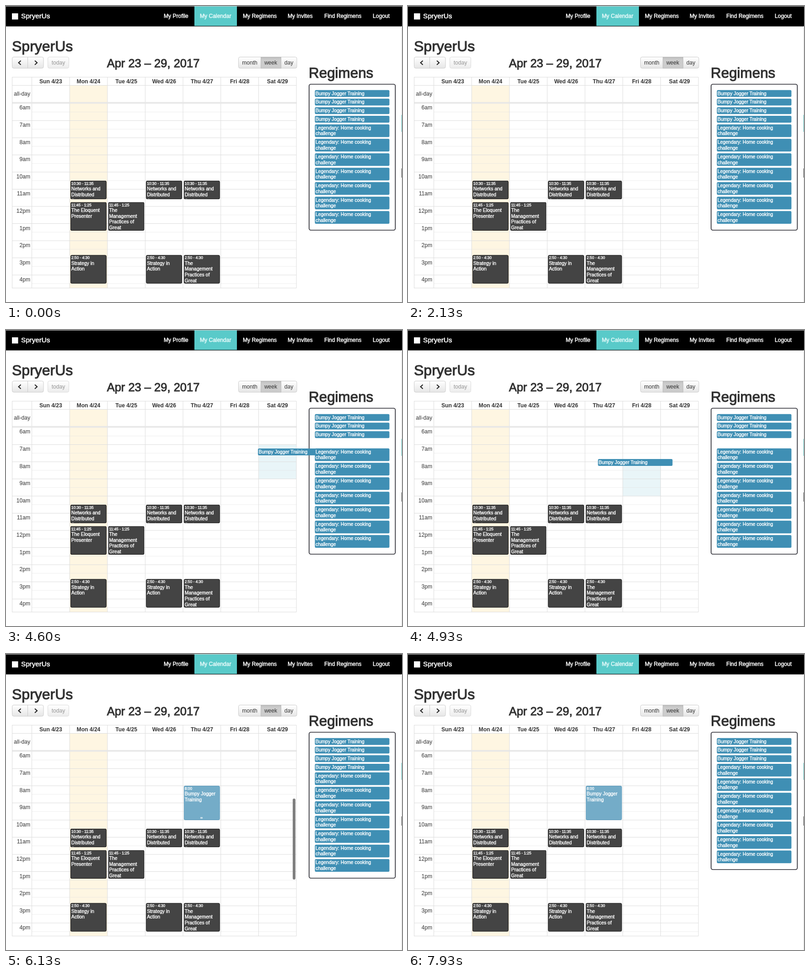
These frames come from a looping animation (866x647 px, 8 s). An HTML page:

```html
<!DOCTYPE html>
<html lang="en">
<head>
<meta charset="utf-8">
<title>Weekly calendar</title>
<style>
  html, body { margin: 0; width: 100%; height: 100%; overflow: hidden; background: #fff; }
  svg { font-family: "Liberation Sans", Arial, sans-serif; }
  #stage { display: block; width: 100vw; height: 100vh; }
  text { white-space: pre; }
</style>
</head>
<body>
<svg id="stage" viewBox="0 0 866 647"></svg>
<script>
const LOOP = 8000;
const DROP = 5800, REMOVE = 6500, LEAVE = 6950;
const GRID = { left: 56.5, top: 213, col: 82.65, hour: 37.5, right: 635, bottom: 616.5 };
const LIST = { x: 675.5, y: 183.7, w: 163, single: 18.75, double: 31.6, line: 12.75 };
const INK = '#333', LINE = '#ddd', BLUE = '#3f8fb4';
const BRAND = 'SpryerUs', TRAINING = 'Bumpy Jogger Training';

const colX = c => GRID.left + c * GRID.col;
const hourY = h => GRID.top + (h - 6) * GRID.hour;
const range = n => [...Array(n).keys()];

const rect = (x, y, w, h, fill, more = '') =>
  `<rect x="${x}" y="${y}" width="${w}" height="${h}" fill="${fill}" ${more}/>`;
const hline = (x1, x2, y, more = '') =>
  `<path d="M${x1} ${y}H${x2}" stroke="${LINE}" ${more}/>`;
const vline = (x, y1, y2, color = LINE) =>
  `<path d="M${x} ${y1}V${y2}" stroke="${color}"/>`;

// y is the middle of the capitals; weight thickens the strokes
function text(str, x, y, size, { fill = INK, weight = 0, anchor = 'start', bold = false } = {}) {
  return `<text x="${x}" y="${y + size * 0.36}" font-size="${size}" fill="${fill}" text-anchor="${anchor}"
    stroke="${fill}" stroke-width="${weight}" ${bold ? 'font-weight="bold"' : ''}>${str}</text>`;
}

function navbar() {
  const links = [['My Profile', 345], ['My Calendar', 424], ['My Regimens', 518],
    ['My Invites', 616], ['Find Regimens', 696], ['Logout', 802]];
  return rect(0, 1, 866, 43.6, '#000') + rect(412, 1, 93, 42.5, '#59cac9') +
    rect(13, 16, 13.5, 13.5, '#fff') +
    text(BRAND, 33, 22, 15.2, { fill: '#fff', weight: 0.55 }) +
    links.map(([label, x]) => text(label, x, 22, 12.1,
      { fill: label === 'My Calendar' ? '#e9fafa' : '#fff', weight: 0.5 })).join('');
}

function toolbar() {
  const button = (x, w, more = '') =>
    rect(x, 111.5, w, 24.5, 'url(#btn)', `stroke="#ccc" rx="3.5" ${more}`);
  const label = (str, x, fill = INK) => text(str, x, 124, 12.1, { fill, anchor: 'middle' });
  const chevron = (x, dir) =>
    `<path d="M${x - 2.5 * dir} 119.5l${5 * dir} 4.5l${-5 * dir} 4.5" fill="none" stroke="#222" stroke-width="2.1"/>`;
  return button(13.5, 68.5) + vline(47.5, 112, 136, '#ccc') + chevron(30, -1) + chevron(65.5, 1) +
    button(91.5, 46, 'opacity=".7"') + label('today', 114.5, '#959595') +
    text('Apr 23 – 29, 2017', 322, 125, 25.5, { weight: 1, anchor: 'middle' }) +
    button(508.5, 127.5) + rect(557.5, 111.5, 44, 24.5, 'url(#pressed)', 'stroke="#bbb"') +
    label('month', 533) + label('week', 579) + label('day', 618.5);
}

function grid() {
  const days = ['Sun 4/23', 'Mon 4/24', 'Tue 4/25', 'Wed 4/26', 'Thu 4/27', 'Fri 4/28', 'Sat 4/29'];
  const hours = ['6am', '7am', '8am', '9am', '10am', '11am', '12pm', '1pm', '2pm', '3pm', '4pm'];
  const rows = hours.map((label, i) => {
    const y = GRID.top + i * GRID.hour;
    return (i ? hline(13, GRID.right, y) : '') +
      hline(GRID.left, GRID.right, y + GRID.hour / 2, 'stroke-dasharray="1 1"') +
      text(label, 53, 222 + i * 37.6, 12.1, { anchor: 'end' });
  }).join('');
  return rows + range(8).map(c => vline(colX(c), 155.5, GRID.bottom)).join('') +
    vline(13.5, 155.5, GRID.bottom) +
    [155.5, 173.5, GRID.bottom].map(y => hline(13, GRID.right, y)).join('') +
    rect(13.5, 210.5, 621.5, 2.5, '#eee', `stroke="${LINE}" stroke-width=".8"`) +
    days.map((d, c) => text(d, colX(c + 0.5), 165, 12.1, { anchor: 'middle', bold: true })).join('') +
    text('all-day', 53, 192, 12.1, { anchor: 'end' });
}

function calendarEvent(col, from, to, time, lines, fill = '#444', border = '#000') {
  const white = { fill: '#fff', weight: 0.4 };
  const height = (to - from) * GRID.hour;
  return `<svg x="${colX(col) + 1.7}" y="${hourY(from)}" width="79" height="${height}">` +
    rect(0.5, 0.5, 78, height - 1, fill, 'rx="2.5"') +
    text(time, 2, 6, 8.4, white) +
    lines.map((s, i) => text(s, 2, 17.7 + i * 12.7, 10.45, white)).join('') +
    rect(0.5, 0.5, 78, height - 1, 'none', `stroke="${border}" rx="2.5"`) + '</svg>';
}

function classes() {
  const networks = ['Networks and', 'Distributed', 'Systems'];
  const management = ['The', 'Management', 'Practices of', 'Great'];
  const strategy = ['Strategy in', 'Action'];
  const at = (h, m) => h + m / 60;
  const morning = c => calendarEvent(c, at(10, 30), at(11, 35), '10:30 - 11:35', networks);
  const noon = (c, lines) => calendarEvent(c, at(11, 45), at(13, 25), '11:45 - 1:25', lines);
  const afternoon = (c, lines) => calendarEvent(c, at(14, 50), at(16, 30), '2:50 - 4:30', lines);
  return [1, 3, 4].map(morning).join('') +
    noon(1, ['The Eloquent', 'Presenter']) + noon(2, management) +
    afternoon(1, strategy) + afternoon(3, strategy) + afternoon(4, management);
}

function card(y, lines, id = '') {
  return `<g ${id && `id="${id}"`}>` +
    rect(LIST.x, y, LIST.w, 2.2 + lines.length * LIST.line, BLUE, 'rx="2.5"') +
    lines.map((s, i) => text(s, LIST.x + 1.5, y + 7.3 + i * LIST.line, 10.4, { fill: '#fff', weight: 0.4 })).join('') +
    '</g>';
}

function sidebar() {
  const cooking = range(7).map(i => card(LIST.y + 4 * LIST.single + i * LIST.double,
    ['Legendary: Home cooking', 'challenge'])).join('');
  return text('Regimens', 662, 146, 31.4, { weight: 1.1 }) +
    rect(662.8, 171, 188.6, 319, 'none', 'id="panel" stroke="#2b2b33" stroke-width="1.7" rx="4"') +
    range(4).map(i => card(LIST.y + i * LIST.single, [TRAINING], i === 3 ? 'dragged' : '')).join('') +
    `<g id="cooking">${cooking}</g>`;
}

const windowEdge = () => vline(865.5, 44, 647, '#ddd') + vline(865.5, 238, 275, '#3fa9a8') +
  vline(865.5, 355, 375, '#333');

const stage = document.getElementById('stage');
stage.innerHTML = `<defs>
    <linearGradient id="btn" x2="0" y2="1"><stop stop-color="#fff"/><stop offset="1" stop-color="#e6e6e6"/></linearGradient>
    <linearGradient id="pressed" x2="0" y2="1"><stop stop-color="#bdbdbd"/><stop offset=".25" stop-color="#ccc"/></linearGradient>
  </defs>` +
  rect(0, 0, 866, 647, '#fff') + rect(0, 0, 866, 1, '#ccc') +
  rect(colX(1), 174, GRID.col, 442, '#fef6e2') +
  rect(0, 0, GRID.col, 2 * GRID.hour, '#e9f5f8', 'id="target"') +
  grid() + navbar() + text(BRAND, 13, 87, 32, { weight: 1.1 }) + toolbar() + classes() +
  `<g id="placed">${calendarEvent(4, 8, 10, '8:00', ['Bumpy Jogger', 'Training'], '#74acc8', '#5797ba')}
    <g id="grip">${rect(425, 356.8, 5, 1, '#fff')}${rect(425, 358.6, 5, 1, '#fff')}</g></g>` +
  rect(627, 316, 6, 177, '#7f7f7f', 'id="scrollbar" rx="3"') +
  sidebar() + windowEdge();

const part = Object.fromEntries(['target', 'placed', 'grip', 'scrollbar', 'panel', 'dragged', 'cooking']
  .map(id => [id, document.getElementById(id)]));
const show = (el, on) => el.setAttribute('visibility', on ? 'inherit' : 'hidden');
const move = (el, x, y) => el.setAttribute('transform', `translate(${x} ${y})`);

// time, x, y of the dragged card, easing on the way there
const home = [LIST.x, LIST.y + 3 * LIST.single];
const path = [
  [3850, ...home],
  [4600, 551.5, 259],
  [5330, 357.5, 291.7],
];
const easings = [u => u * u, u => 1 - (1 - u) ** 2];

function cardAt(t) {
  if (t <= path[0][0] || t >= DROP) return home;
  const i = path.findIndex(p => t < p[0]);
  if (i < 0) return path.at(-1).slice(1);
  const [t0, x0, y0] = path[i - 1], [t1, x1, y1] = path[i];
  const u = easings[i - 1]((t - t0) / (t1 - t0));
  return [x0 + (x1 - x0) * u, y0 + (y1 - y0) * u];
}

function render(t) {
  const [x, y] = cardAt(t);
  move(part.dragged, x - home[0], y - home[1]);

  // the two-hour slot under the pointer
  const pointerX = x + 60, slot = GRID.hour / 2;
  const over = t < DROP && pointerX < GRID.right;
  show(part.target, over);
  if (over) {
    move(part.target, colX(Math.floor((pointerX - GRID.left) / GRID.col)),
      GRID.top + Math.floor((y + 7 - GRID.top) / slot) * slot);
  }

  const removed = t >= REMOVE;
  show(part.placed, t >= DROP);
  show(part.grip, t >= DROP && t < LEAVE);
  show(part.dragged, !removed);
  move(part.cooking, 0, removed ? -LIST.single : 0);
  part.panel.setAttribute('height', removed ? 319 - LIST.single : 319);
  part.scrollbar.setAttribute('opacity', t < DROP ? 0 : Math.min(1, Math.max(0, (6650 - t) / 250)));
}

const start = performance.now();
function tick() {
  render((performance.now() - start) % LOOP);
  requestAnimationFrame(tick);
}
tick();
</script>
</body>
</html>
```
